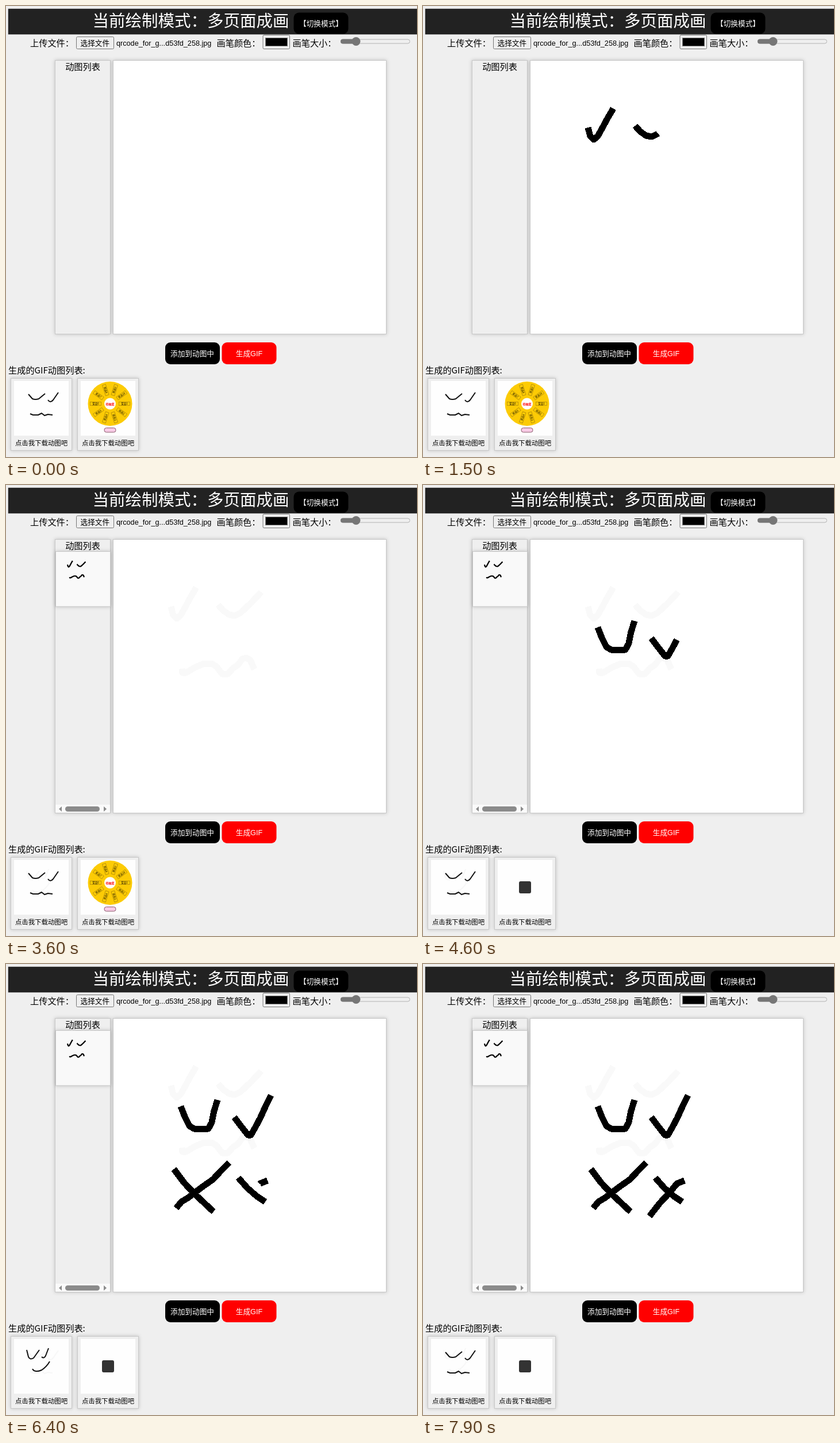
An HTML page for the animation above (8 s loop, 715 by 783 pixels).

```html
<!DOCTYPE html>
<html lang="zh">
<head>
<meta charset="utf-8">
<style>
html, body { margin: 0; height: 100%; overflow: hidden; background: #efefef; }
svg { display: block; width: 715px; height: 783px; font: 15.2px "Noto Sans CJK SC", "Noto Sans CJK", sans-serif; }
.box { fill: #efefef; stroke: #c8c8c8; filter: drop-shadow(0 0 3px #0003); }
.mid { text-anchor: middle; }
.ui { font: 12.67px "Liberation Sans", "Noto Sans CJK SC", "Noto Sans CJK", sans-serif; }
.btn { fill: #fff; text-anchor: middle; }
.cap { font-size: 11.4px; text-anchor: middle; }
.pen { fill: none; stroke-linejoin: round; }
.field { fill: #efefef; stroke: #767676; }
</style>
</head>
<body>
<svg viewBox="0 0 715 783">
  <rect x="3.800" y="4.750" width="712" height="44.600" fill="#222"/>
  <text x="150.500" y="36" font-size="28.5" fill="#fff">当前绘制模式：多页面成画</text>
  <rect x="500.500" y="11.500" width="95" height="37" rx="9"/>
  <text class="ui btn" x="548" y="35">【切换模式】</text>

  <text x="42" y="69.500">上传文件：</text>
  <rect class="field" x="122.500" y="53.500" width="65" height="21" rx="2"/>
  <text class="ui" x="129.500" y="69">选择文件</text>
  <text class="ui" x="192" y="69">qrcode_for_g...d53fd_258.jpg</text>
  <text x="366.500" y="69.500">画笔颜色：</text>
  <rect class="field" x="447" y="50.500" width="46.500" height="24" rx="2"/>
  <rect x="451.500" y="55.500" width="38" height="14" stroke="#777"/>
  <text x="498.500" y="69.500">画笔大小：</text>
  <rect x="582.500" y="58" width="120" height="7" rx="3.500" fill="#efefef" stroke="#b2b2b2"/>
  <rect x="582" y="57.500" width="27" height="8" rx="4" fill="#767676"/>
  <circle cx="609" cy="61.500" r="7.500" fill="#767676"/>

  <rect class="box" x="85.500" y="94.500" width="96" height="475"/>
  <text class="mid" x="133.500" y="111">动图列表</text>
  <rect class="box" x="186.500" y="94.500" width="475" height="475" style="fill:#fff"/>

  <g class="pen" stroke-width="11" shape-rendering="crispEdges">
    <g id="first"><g id="face"></g></g>
    <g id="second" stroke="#000"></g>
  </g>

  <g id="item">
    <rect class="box" x="86.500" y="115.500" width="95" height="95.500" style="fill:#f9f9f9"/>
    <use class="pen" href="#face" stroke="#000" stroke-width="11" transform="translate(87 115) scale(.2) translate(-187 -95)"/>
    <rect x="86" y="555" width="95" height="14" fill="#fafafa"/>
    <rect x="103" y="558" width="60" height="9" rx="4.500" fill="#8b8b8b"/>
    <path d="M97 558v9l-5-4.500zM170 558v9l5-4.500z" fill="#8b8b8b"/>
  </g>

  <rect x="277" y="584" width="95" height="38" rx="9"/>
  <text class="ui btn" x="324" y="607.500">添加到动图中</text>
  <rect x="375.500" y="584" width="95" height="38" rx="9" fill="red"/>
  <text class="ui btn" x="423" y="607.500">生成GIF</text>
  <text x="4" y="638">生成的GIF动图列表:</text>

  <rect class="box" x="8.500" y="646.500" width="106" height="125"/>
  <rect x="14" y="651" width="95" height="95" fill="#fefefe"/>
  <text class="cap" x="61.500" y="763">点击我下载动图吧</text>
  <g class="pen" stroke-width="2">
    <path id="faceA" d="M39 674L46 682Q51 684 57 682L68 673M73 684Q77 690 82 684L91 671M42 708L47 710H56L62 707L67 711L73 709L81 710"/>
    <path id="faceB" d="M36 670L39 682Q42 688 48 684L58 670M62 682Q66 686 69 680L74 667M46 703Q50 710 62 705Q71 699 76 690"/>
  </g>

  <rect class="box" x="124.500" y="646.500" width="106" height="125"/>
  <rect x="130" y="651" width="95" height="95" fill="#fefefe"/>
  <text class="cap" x="177.500" y="763">点击我下载动图吧</text>
  <g id="wheel">
    <circle cx="181" cy="690.500" r="38.500" fill="#fccb05"/>
    <g id="prizes" class="mid" font-size="4.500" transform="translate(181 690.500)"></g>
    <circle cx="181" cy="690.500" r="10" fill="#fff"/>
    <text class="mid" x="181" y="692.500" font-size="5" font-weight="bold" fill="red">待抽奖</text>
    <rect x="171" y="732.500" width="20" height="7.500" rx="3.500" fill="#f8cbe6" stroke="#8a5a6a"/>
  </g>
  <rect id="badge" x="167" y="688" width="21" height="21" rx="3" fill="#333"/>
</svg>
<script>
const $ = id => document.getElementById(id);
const NS = 'http://www.w3.org/2000/svg';
const CLEAR = 3300, LOOP = 8000;

function add(parent, tag, attrs) {
  const el = document.createElementNS(NS, tag);
  for (const k in attrs) el.setAttribute(k, attrs[k]);
  return parent.appendChild(el);
}

// Each stroke: parent group, points, then [time, fraction drawn] keys
const strokes = [
  ['face', '287 211 291 226 297 232 304 226 314 208 321 195 331 178', [[600, 0], [900, .24], [1250, 1]]],
  ['face', '369 208 378 218 388 225 398 227 408 222 426 205 444 186', [[1290, 0], [1720, 1]]],
  ['face', '306 319 307 326 313 326 330 316 345 310 358 310 366 315 376 328 386 328 395 318 404 312 411 302 418 300 425 304 432 320', [[1850, 0], [2600, 1]]],
  ['second', '304 247 311 265 319 281 327 286 352 286 358 275 362 255 368 236', [[3700, 0], [4250, 1]]],
  ['second', '397 266 410 283 421 297 426 297 434 283 442 268 452 246 461 228', [[4430, 0], [4700, 1]]],
  ['second', '292 356 310 380 330 401 361 430', [[5150, 0], [5500, 1]]],
  ['second', '388 345 375 358 360 374 340 388 318 405 305 413 296 424', [[5500, 0], [5950, 1]]],
  ['second', '404 371 420 389 436 403 451 413', [[6000, 0], [6300, 1]]],
  ['second', '455 376 442 381 428 398 412 415 394 438', [[6340, 0], [6700, 1]]]
].map(([group, points, keys]) => ({ el: add($(group), 'polyline', { points, pathLength: 1 }), keys }));

for (let i = 0; i < 10; i++) {
  const flip = i > 2 && i < 8;
  const g = add($('prizes'), 'g', { transform: `rotate(${i * 36}) translate(25 0) rotate(${flip ? 180 : 0})` });
  add(g, 'rect', { x: -9.5, y: -3, width: 19, height: 6, fill: 'none', stroke: '#a8820a', 'stroke-width': .7 });
  add(g, 'text', { y: 1.7 }).textContent = '奖品' + (i + 1);
}

function fraction(keys, t) {
  if (t <= keys[0][0]) return 0;
  for (let i = 1; i < keys.length; i++) {
    const [t0, p0] = keys[i - 1], [t1, p1] = keys[i];
    if (t < t1) return p0 + (p1 - p0) * (t - t0) / (t1 - t0);
  }
  return 1.01;
}

const show = (id, on) => $(id).setAttribute('visibility', on ? 'visible' : 'hidden');

function draw(now) {
  const step = Math.floor(now % LOOP / 100), t = step * 100;
  for (const { el, keys } of strokes) {
    el.setAttribute('stroke-dasharray', fraction(keys, t) + ' 3');
  }
  const cleared = t >= CLEAR;
  $('first').setAttribute('stroke', cleared ? '#f9f9f9' : '#000');
  show('item', cleared);

  // The two previews flip at different rates
  const phase = step / 3.3 % 1, isB = phase >= .2 && phase < .47;
  const ghost = t >= 2800 ? '#f7f7f7' : '#fefefe';
  $('faceA').setAttribute('stroke', isB ? ghost : '#111');
  $('faceB').setAttribute('stroke', isB ? '#111' : ghost);
  $('faceA').parentNode.append($(isB ? 'faceB' : 'faceA'));
  const wheel = step % 3 !== 1;
  show('wheel', wheel);
  show('badge', !wheel);
  requestAnimationFrame(draw);
}
draw(0);
</script>
</body>
</html>
```
